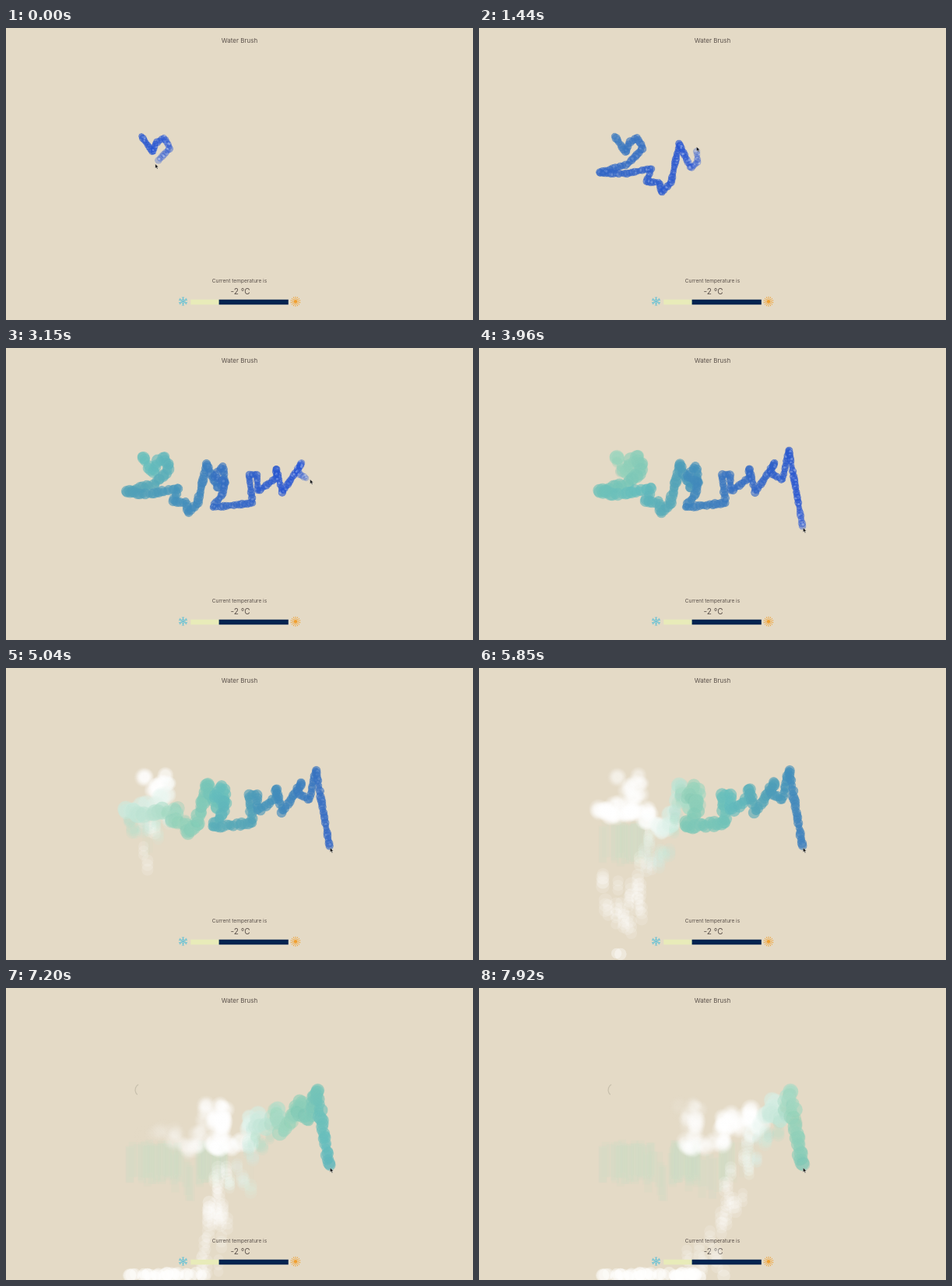
Recreate the animation shown at these times as an HTML page with a canvas. Size 600 px wide and 375 px high, loop 8000 ms.

```html
<!DOCTYPE html>
<html lang="en">
<head>
<meta charset="utf-8">
<title>Water Brush</title>
<style>
  html, body { margin: 0; width: 100%; height: 100%; overflow: hidden; background: #e4dac6; }
  svg, canvas { position: absolute; left: 0; top: 0; width: 600px; height: 375px; }
  text { font-family: Inter, "Open Sans", sans-serif; fill: #5a504a; text-anchor: middle; }
</style>
</head>
<body>
<svg viewBox="0 0 600 375">
  <text x="300" y="19" font-size="8">Water Brush</text>
  <text x="301" y="341.6" font-size="10">-2 °C</text>
  <g id="flake" transform="translate(227.5 351)" stroke="#5bbfd6" stroke-width=".7" fill="none"></g>
</svg>
<canvas id="water" width="600" height="375"></canvas>
<svg viewBox="0 0 600 375">
  <path id="stroke" fill="none" d="M174 139L189 160 192 148 203 141 211 154 191 175
    154 186 190 187 222 180 215 198 232 198 234 212 247 198 257 148 272 180 281 172 279 152
    266 165 282 172 278 188 265 205 317 199 312 163 322 162 324 184 347 167 347 154 355 186
    380 147 374 160 390 170 398 130 416 231"/>
  <text x="300" y="326.5" font-size="6.6">Current temperature is</text>
  <path d="M237.3 348.7h37v6.6h-37z" fill="#e8ebb9"/>
  <path d="M273.6 348.7h89.2v6.6h-89.2z" fill="#022450"/>
  <g id="sun" transform="translate(372 351.3)" stroke="#f0a030" stroke-width=".9" fill="none">
    <circle r="2.4" fill="#f0a030" stroke="none"/>
    <circle r="3.6" stroke-width=".7"/>
  </g>
  <path id="cursor" d="M0 0v5.4l1.3-1.1 1 2.1 .9-.4-1-2.1h1.8z" fill="#111" stroke="#eee" stroke-width=".3"/>
</svg>
<script>
const LOOP = 8000, STEP = 90, FLOOR = 369, GRAVITY = 110;
const SPEED = .205, DONE = 95, SPACING = 3.4; // px per ms, px painted at the start, px between drops
const ctx = document.getElementById('water').getContext('2d');
const stroke = document.getElementById('stroke');
const cursor = document.getElementById('cursor');

const clamp = v => Math.max(0, Math.min(1, v));
const random = n => { const v = Math.sin(n * 127.1 + 11.7) * 43758.5453; return v - Math.floor(v); };

// Ages are in seconds: water cools from blue through green to white and swells.
function tint(age, alpha) {
  const a = Math.max(0, age);
  const hue = Math.max(155, 224 - 3.6 * a * a);
  const saturation = Math.max(40, 74 - 11 * a);
  const light = Math.min(100, 48 + .036 * a ** 4.4);
  return `hsla(${hue},${saturation}%,${light}%,${alpha})`;
}
const radius = age => Math.min(10.5, 4.7 + .23 * age * age);

const drops = [];
for (let at = 0, i = 0; at < stroke.getTotalLength(); at += SPACING, i++) {
  const { x, y } = stroke.getPointAtLength(at);
  drops.push({
    x, y,
    birth: (at - DONE) / SPEED,
    dx: random(i) - .5,
    dy: random(i + 500) - .6,
    scale: .78 + .36 * random(i + 900),
    falls: random(i + 40) < .45,
    delay: 4 + .5 * random(i + 300)
  });
}

const fallen = (d, age) => GRAVITY / 2 * Math.max(0, age - d.delay) ** 2;

function disc(x, y, r, fill) {
  ctx.fillStyle = fill;
  ctx.beginPath();
  ctx.arc(x, y, r, 0, 7);
  ctx.fill();
}

function drawStreak(d, age) {
  const top = Math.max(d.y + 10, 194) + 10 * random(d.birth);
  const height = Math.min(46 + 14 * d.dx, d.y + fallen(d, age) - top);
  if (height <= 0) return;
  ctx.fillStyle = `rgba(203,218,196,${.22 * clamp(age - 5)})`;
  ctx.fillRect(d.x - 5, top, 10, height);
}

function drawFalling(d, x, y, age) {
  const r = radius(age) * d.scale * (1 - .25 * clamp((age - d.delay) * 2));
  for (let lag = .12; lag >= 0; lag -= .04) {
    const fallY = Math.min(FLOOR + 6 * d.dx, y + fallen(d, age - lag));
    disc(x, fallY, r, tint(age - .2, lag > .01 ? .15 : .82));
  }
}

function drawResting(d, x, y, age) {
  const alpha = .64 * (1 - clamp((age - 5.8) / 1.1)) * clamp(.4 + age * 2);
  const soft = clamp((age - 4.8) / .7);
  const r = radius(age) * d.scale * (1 + .2 * soft);
  const fill = ctx.createRadialGradient(x, y, 0, x, y, r);
  fill.addColorStop(.9 - .5 * soft, tint(age, alpha));
  fill.addColorStop(1, tint(age, alpha * .4 * (1 - soft)));
  disc(x, y, r, fill);
  const shine = .38 * (1 - clamp(age / 2.4));
  disc(x + d.dx * 5, y + d.dy * 5, r * .32, `rgba(225,235,255,${shine})`);
}

function drawDrop(d, age) {
  const spread = .32 * Math.min(age, 5) ** 2;
  const draw = d.falls && age > d.delay ? drawFalling : drawResting;
  draw(d, d.x + d.dx * spread, d.y + d.dy * spread, age);
}

function drawStain(time) {
  ctx.strokeStyle = `rgba(185,178,160,${.65 * clamp((time - 5900) / 500)})`;
  ctx.lineWidth = 1.2;
  ctx.beginPath();
  ctx.arc(174, 131, 8, 2.3, 4.2);
  ctx.stroke();
}

function draw(time) {
  const age = d => (time - d.birth) / 1000;
  const live = drops.filter(d => age(d) > .025);
  ctx.clearRect(0, 0, 600, 375);
  drawStain(time);
  live.filter(d => d.falls).forEach(d => drawStreak(d, age(d)));
  live.forEach(d => drawDrop(d, age(d)));
  const { x, y } = stroke.getPointAtLength(DONE + time * SPEED);
  cursor.setAttribute('transform', `translate(${x + .5} ${y})`);
}

function addRays(id, count, path) {
  const rays = Array.from({ length: count }, (_, i) =>
    `<path d="${path}" transform="rotate(${i * 360 / count})"/>`);
  document.getElementById(id).insertAdjacentHTML('beforeend', rays.join(''));
}
addRays('flake', 6, 'M0 0V-5.8M-1.7-5.4L0-3.8 1.7-5.4M-1.4-2.4H1.4');
addRays('sun', 14, 'M0-4.6V-6.4');

function tick(now) {
  draw(Math.floor(now % LOOP / STEP) * STEP);
  requestAnimationFrame(tick);
}
draw(0);
requestAnimationFrame(tick);
</script>
</body>
</html>
```
